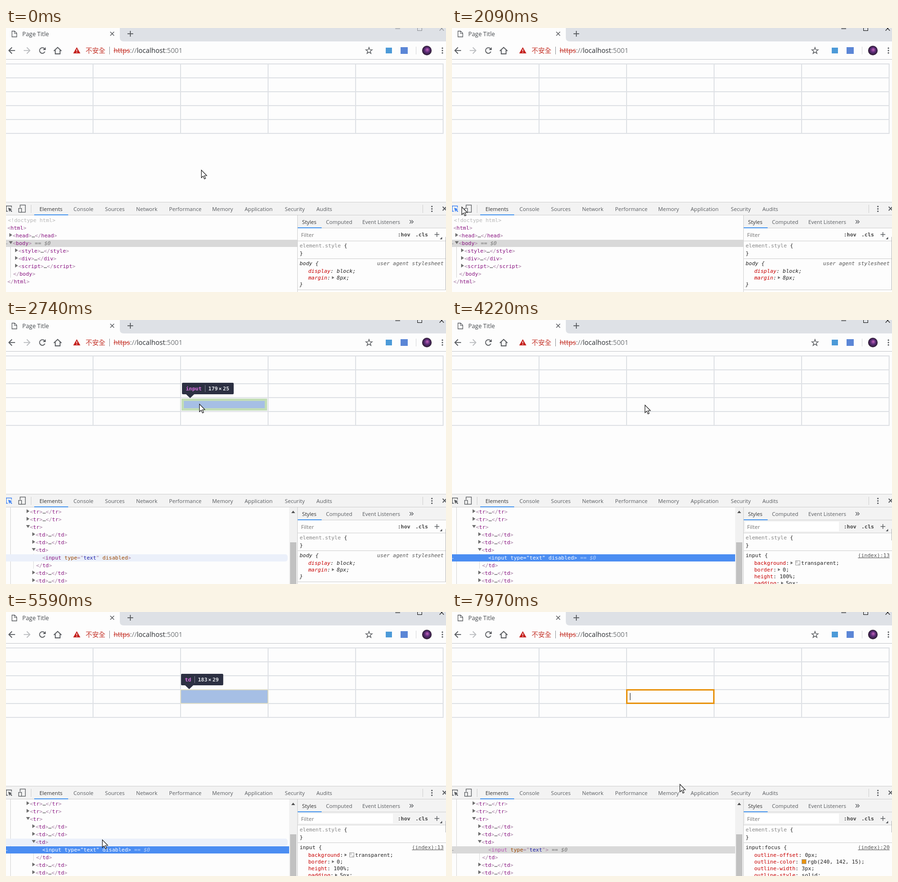
Write an HTML page with a canvas that moves like this. It is 920 by 551 pixels and loops after 8000 ms.

```html
<!DOCTYPE html>
<html lang="en">
<head>
<meta charset="utf-8">
<title>Inspecting a table</title>
<style>
  html, body { margin: 0; width: 100%; height: 100%; overflow: hidden; background: #fdfdfd; }
  canvas { display: block; }
</style>
</head>
<body>
<canvas id="stage" width="920" height="551"></canvas>
<script>
const ctx = document.getElementById('stage').getContext('2d');
const LOOP = 8000;
const sans = (size) => `${size}px "Open Sans", "Noto Sans", sans-serif`;
const MONO = '11px "DejaVu Sans Mono", monospace';
const CJK = '13.7px "Noto Sans CJK TC", "Noto Sans CJK SC", "Noto Sans CJK JP", "Noto Sans CJK", sans-serif';
const CHAR = 6.62;
const INK = '#5a5d61', PANEL = '#f3f3f3', RULE = '#cfcfcf', PAGE = '#fdfdfd', GRID = '#dee1e5';

// Timeline, in ms
const INSPECT = 1920, PICK = 3450, PICK_STYLES = 3520;
const BLUR = 6870, EDIT = 6970, EDIT_STYLES = 7080, FLASH_END = 7680;

// Mouse path: time, x, y
const PATH = [
  [0, 408, 296], [880, 408, 296], [1670, 5, 379], [2020, 5, 379], [2090, 20, 373],
  [2710, 400, 177], [2740, 404, 175], [4200, 404, 175], [4670, 193, 503], [4840, 193, 503],
  [4960, 198, 485], [5080, 199, 480], [5300, 203, 522], [5420, 203, 522], [5590, 201, 475],
  [5660, 201, 475], [6380, 481, 175], [7830, 481, 175], [7970, 476, 359], [8000, 476, 362]
];

function mouseAt(t) {
  const i = Math.max(1, PATH.findIndex(p => p[0] >= t));
  const [t0, x0, y0] = PATH[i - 1], [t1, x1, y1] = PATH[i];
  let k = Math.max(0, (t - t0) / (t1 - t0));
  if (t1 - t0 > 130) k = k * k * (3 - 2 * k);
  return { x: Math.round(x0 + (x1 - x0) * k), y: Math.round(y0 + (y1 - y0) * k) };
}

function rect(x, y, w, h, color) {
  ctx.fillStyle = color;
  ctx.fillRect(x, y, w, h);
}

function shape(points, { fill, stroke, width = 1, close = !!fill }) {
  ctx.beginPath();
  for (let i = 0; i < points.length; i += 2) ctx.lineTo(points[i], points[i + 1]);
  if (close) ctx.closePath();
  if (fill) { ctx.fillStyle = fill; ctx.fill(); }
  if (stroke) { ctx.strokeStyle = stroke; ctx.lineWidth = width; ctx.stroke(); }
}
const line = (points, stroke, width = 1) => shape(points, { stroke, width });

function box(x, y, w, h, stroke, width = 1) {
  ctx.strokeStyle = stroke;
  ctx.lineWidth = width;
  ctx.strokeRect(x, y, w, h);
}

function disc(x, y, r, color) {
  ctx.fillStyle = color;
  ctx.beginPath();
  ctx.arc(x, y, r, 0, 7);
  ctx.fill();
}

function text(s, x, y, color, font = MONO) {
  ctx.font = font;
  ctx.fillStyle = color;
  ctx.fillText(s, x, y + 4);
  return x + ctx.measureText(s).width;
}

function cross(x, y, r, color, width = 1.5) {
  line([x - r, y - r, x + r, y + r], color, width);
  line([x + r, y - r, x - r, y + r], color, width);
}
function plus(x, y, r, color, width = 1.5) {
  line([x - r, y, x + r, y], color, width);
  line([x, y - r, x, y + r], color, width);
}
const dots = (x, y, step) => [-1, 0, 1].forEach(i => disc(x, y + i * step, 1.6, INK));

function triangle(x, y, open) {
  shape(open ? [x - 1, y - 3, x + 7, y - 3, x + 3, y + 3] : [x, y - 4, x + 6, y, x, y + 4], { fill: '#6e6e6e' });
}

function drawBrowser(active) {
  rect(0, 0, 920, 28, '#dee1e6');
  ctx.fillStyle = PAGE;
  ctx.beginPath();
  ctx.moveTo(0, 0); ctx.lineTo(238, 0); ctx.lineTo(238, 20);
  ctx.quadraticCurveTo(238, 28, 246, 28); ctx.lineTo(0, 28);
  ctx.fill();
  shape([12.5, 6.5, 18, 6.5, 22.5, 11, 22.5, 18.5, 12.5, 18.5], { stroke: INK, width: 1.3, close: true });
  line([17.5, 6.5, 17.5, 11.5, 22, 11.5], INK);
  text('Page Title', 34, 13, '#45494d', sans(12.4));
  cross(222, 12, 4, INK);
  plus(260, 12, 6, INK, 1.8);
  const frame = active ? '#111' : '#8d9095';
  line([814, 1.5, 824, 1.5], frame);
  box(860.5, -4.5, 9, 10, frame);
  cross(911, 1, 4.5, frame, 1.1);

  line([19, 47, 6, 47], INK, 1.8);
  line([12.5, 40.5, 6, 47, 12.5, 53.5], INK, 1.8);
  line([37, 47, 50, 47], '#bcbec1', 1.8);
  line([43.5, 40.5, 50, 47, 43.5, 53.5], '#bcbec1', 1.8);
  ctx.strokeStyle = INK;
  ctx.lineWidth = 1.8;
  ctx.beginPath();
  ctx.arc(76, 47, 5.8, 0.4, 5.5);
  ctx.stroke();
  shape([83, 40, 83, 46, 77, 46], { fill: INK });
  line([100, 48, 108, 40.5, 116, 48], INK, 1.8);
  line([103, 46, 103, 54, 113, 54, 113, 46], INK, 1.8);
  shape([148, 40, 155.5, 53, 140.5, 53], { fill: '#c5221f' });
  line([148, 44.5, 148, 48.5], '#fff', 1.5);
  rect(147.3, 50, 1.5, 1.5, '#fff');
  text('不安全', 166.5, 48, '#c5362c', CJK);
  rect(216, 39, 1, 16, '#8f9296');
  const schemeEnd = text('https', 225, 48, '#c5362c', sans(14.2));
  line([225, 47.5, schemeEnd, 47.5], '#c5362c', 1.2);
  const hostStart = text('://', schemeEnd, 48, '#75787b', sans(14.2));
  const hostEnd = text('localhost', hostStart, 48, '#2c2f33', sans(14.2));
  text(':5001', hostEnd, 48, '#75787b', sans(14.2));

  const star = [];
  for (let i = 0; i < 10; i++) {
    const r = i % 2 ? 2.9 : 7, a = i * Math.PI / 5;
    star.push(759 + r * Math.sin(a), 47.5 - r * Math.cos(a));
  }
  shape(star, { stroke: INK, width: 1.4, close: true });
  rect(794, 41, 13, 12, '#4c9ad8');
  rect(825, 40, 15, 14, '#5b86d6');
  rect(857, 39, 1, 16, '#d5d7da');
  const photo = ctx.createRadialGradient(881, 45, 1, 880, 47, 10);
  photo.addColorStop(0, '#b45ab0');
  photo.addColorStop(0.45, '#5a2c78');
  photo.addColorStop(1, '#2a1b2e');
  disc(880, 47, 10, photo);
  dots(912.5, 47, 5);
  rect(0, 65, 920, 1, '#c4c6c9');
}

function drawTable() {
  for (let i = 0; i < 6; i++) {
    rect(0, 74 + 29 * i, 915, 2, GRID);
    rect(183 * i - 2, 74, 2, 147, GRID);
  }
}

// Elements the inspector can point at
const td = (col, row) => ({ name: 'td', x: 183 * col - 1, y: 75 + 29 * row, w: 183, h: 29, edge: 1 });
const input = (col, row) => ({ name: 'input', x: 183 * col + 1, y: 77 + 29 * row, w: 179, h: 25, edge: 5 });
const tr = (row) => ({ name: 'tr', x: -1, y: 75 + 29 * row, w: 915, h: 29, edge: 0 });
const ROOT = { name: 'html', x: -9, y: 66, w: 931, h: 163, edge: 0 };

// Tree rows: markup, x, arrow (c: closed, o: open), element
const TOP_ROWS = [
  ['<!doctype html>', 4], ['<html>', 3], ['<head>…</head>', 14, 'c'], ['<body>', 14, 'o'],
  ['<style>…</style>', 26, 'c'], ['<div>…</div>', 26, 'c'], ['<script>…<\/script>', 26, 'c'],
  ['</body>', 15], ['</html>', 3]
];
const CELL_ROWS = [
  ['<tr>…</tr>', 50, 'c', tr(1)], ['<tr>…</tr>', 50, 'c', tr(2)], ['<tr>', 50, 'o', tr(3)],
  ['<td>…</td>', 62, 'c', td(0, 3)], ['<td>…</td>', 62, 'c', td(1, 3)], ['<td>', 62, 'o', td(2, 3)],
  ['<input type="text" disabled>', 76, '', input(2, 3)], ['</td>', 63, '', td(2, 3)],
  ['<td>…</td>', 62, 'c', td(3, 3)], ['<td>…</td>', 62, 'c', td(4, 3)]
];

function findHover(t) {
  const { x, y } = mouseAt(t - 40);
  if (t >= INSPECT && t < PICK) {
    if (y > 363) return null;
    if (y > 221) return { row: 1, target: ROOT };
    return { row: 6, target: input(Math.floor((x + 1) / 183), Math.floor((y - 75) / 29)) };
  }
  if (t < PICK || y < 392 || x > 592) return null;
  const row = Math.floor((y - 392) / 16);
  return { row, target: CELL_ROWS[row][3] };
}

function drawHighlight({ name, x, y, w, h, edge }) {
  rect(x + edge, y + edge, w - 2 * edge, h - 2 * edge, 'rgba(130,165,220,.7)');
  if (edge) {
    const color = name === 'td' ? 'rgba(240,226,150,.66)' : 'rgba(147,196,125,.55)';
    box(x + edge / 2, y + edge / 2, w - edge, h - edge, color, edge);
  }
  const below = y < 100;
  const left = Math.max(0, x + 1), top = below ? y + h + 9 : y - 33;
  const nameWidth = name.length * CHAR, dimsAt = left + nameWidth + 22;
  const bold = 'bold ' + MONO, dark = '#2c3042';
  ctx.fillStyle = dark;
  ctx.beginPath();
  ctx.roundRect(left, top, nameWidth + 75 + (String(h).length - 2) * CHAR, 24, 2);
  ctx.fill();
  const base = below ? top : top + 24, tip = below ? top - 8 : top + 32;
  shape([left + 8.5, base, left + 25.5, base, left + 17, tip], { fill: dark });
  text(name, left + 8, top + 12, '#d86fe0', bold);
  rect(Math.round(left + nameWidth + 15), top + 5, 1, 14, '#7b7f8c');
  text(w, dimsAt, top + 12, '#dfe1e6', bold);
  text('×', dimsAt + 21.5, top + 12, '#dfe1e6', bold);
  text(h, dimsAt + 30.5, top + 12, '#dfe1e6', bold);
}

function markup(source, x, y, white, tagColor = '#881280') {
  let previous = '';
  for (const token of source.match(/<!.*>|<\/?|>|="|"|\w+|\s+|…/g)) {
    let color = '#a67fa3';
    if (token.startsWith('<!')) color = '#b8b8b8';
    else if (token === '…') color = '#333';
    else if (/\w/.test(token)) {
      color = previous.startsWith('<') ? tagColor : previous === '="' ? '#1a1aa6' : '#994500';
    }
    x = text(token, x, y, white ? '#fff' : color);
    previous = token;
  }
  return x;
}

function drawTree(t, hover) {
  const scrolled = t >= PICK || (hover && hover.target !== ROOT);
  const rows = scrolled ? CELL_ROWS : TOP_ROWS;
  const first = scrolled ? 400 : 401, right = scrolled ? 592 : 609;
  const selected = t >= PICK ? 6 : scrolled ? -1 : 3;
  const blue = t >= PICK && t < BLUR;
  rect(9, scrolled ? 391 : 457, 1, scrolled ? 160 : 64, '#d4d4d4');
  if (scrolled) rect(57, 488, 1, 31, '#dcdcdc');
  rows.forEach(([source, x, arrow], i) => {
    const y = first + 16 * i;
    const isInput = scrolled && i === 6;
    if (i === selected) {
      rect(0, y - 7, right, 15, blue ? '#4b8df2' : '#d9d9d9');
      for (let d = 0; d < 2; d++) rect(d * 2, y + 1, 1, 1, blue ? '#fff' : '#777');
    } else if (hover && hover.row === i) {
      ctx.fillStyle = '#ebf0fa';
      ctx.beginPath();
      ctx.roundRect(0, y - 7, right - 3, 15, [0, 5, 5, 0]);
      ctx.fill();
    }
    if (arrow) triangle(x - 7, y - 1, arrow === 'o');
    const edited = isInput && t >= EDIT;
    if (edited && t < FLASH_END) {
      ctx.globalAlpha = 1 - (t - EDIT) / (FLASH_END - EDIT);
      rect(83, y - 7, 33, 14, '#9a4f96');
      ctx.globalAlpha = 1;
    }
    const end = markup(edited ? source.replace(' disabled', '') : source, x, y,
      i === selected && blue, edited ? '#b850b3' : undefined);
    if (i === selected) text('== $0', end + CHAR, y, blue ? '#b5d0fb' : '#777', 'italic ' + MONO);
  });
  if (scrolled) {
    rect(592, 391, 17, 160, '#f1f1f1');
    shape([596.5, 403, 604.5, 403, 600.5, 398], { fill: '#505050' });
    rect(594, 464, 13, 87, '#c1c1c1');
  }
}

// Style rows: property, value, expandable, swatch
const BODY_RULE = [['display', 'block'], ['margin', '8px', true]];
const INPUT_RULE = [
  ['background', 'transparent', true, '#fff'], ['border', '0', true], ['height', '100%'], ['padding', '5px', true]
];
const FOCUS_RULE = [
  ['outline-offset', '0px'], ['outline-color', 'rgb(240, 142, 15)', false, '#e8930f'],
  ['outline-width', '3px'], ['outline-style', 'solid']
];

function drawRule(selector, origin, declarations, isUserAgent) {
  const font = (isUserAgent ? 'italic ' : '') + MONO;
  text(selector + ' {', 614, 491, '#222', font);
  const originX = 915 - origin.length * CHAR;
  text(origin, originX, 491, '#555', font);
  if (!isUserAgent) rect(originX, 496, 915 - originX, 1, '#555');
  declarations.forEach(([property, value, expandable, swatch], i) => {
    const y = 507 + 14 * i;
    let x = text(property, 632, y, '#c80000', font);
    x = text(':', x, y, '#222', font) + CHAR;
    if (expandable) {
      shape([x - 3.5, y - 3, x + 1.5, y, x - 3.5, y + 3], { fill: '#6e6e6e' });
      x += CHAR;
    }
    if (swatch) {
      rect(x, y - 4, 9, 9, swatch);
      if (swatch === '#fff') {
        rect(x, y - 4, 5, 5, '#ddd');
        rect(x + 5, y + 1, 4, 4, '#ddd');
      }
      box(Math.round(x) + .5, y - 4.5, 9, 9, '#999');
      x += 12;
    }
    text(value + ';', x, y, '#222', font);
  });
}

function drawStyles(t) {
  const picked = t >= PICK_STYLES;
  rect(609, 391, 1, 160, RULE);
  rect(610, 391, 310, 27, PANEL);
  rect(610, 417, 310, 1, RULE);
  rect(610, 416, 50, 2, '#4a97ee');
  text('Styles', 619, 405, '#333', sans(11.2));
  text('Computed', 669, 405, INK, sans(11.2));
  text('Event Listeners', 745, 405, INK, sans(11.2));
  for (const x of [844, 848]) line([x, 401, x + 3.5, 404.5, x, 408], INK, 1.4);
  rect(610, 418, 310, 26, picked ? PANEL : PAGE);
  rect(613, 421, 196, 20, picked ? '#fff' : PAGE);
  text('Filter', 617, 432, '#757575', sans(11.5));
  text(':hov', 819, 431, '#444', 'bold ' + MONO);
  text('.cls', 856, 431, '#444', 'bold ' + MONO);
  plus(901, 431, 5, INK, 1.4);
  shape([912, 436, 912, 441, 907, 441], { fill: INK });
  rect(610, 444, 310, 1, RULE);
  text('}', 614, 470, '#222');
  text(' {', text('element.style', 614, 454, '#888'), 454, '#222');
  rect(610, 481, 310, 1, RULE);
  if (t >= EDIT_STYLES) drawRule('input:focus', '(index):20', FOCUS_RULE);
  else if (picked) drawRule('input', '(index):13', INPUT_RULE);
  else {
    drawRule('body', 'user agent stylesheet', BODY_RULE, true);
    text('}', 614, 535, '#222', 'italic ' + MONO);
    rect(610, 546, 310, 1, RULE);
  }
  rect(919, 436, 1, picked ? 24 : 110, '#b5b5b5');
}

const TABS = [['Elements', 70], ['Console', 141], ['Sources', 207], ['Network', 272], ['Performance', 341],
  ['Memory', 431], ['Application', 499], ['Security', 583], ['Audits', 649]];

function drawDevtools(t, hover) {
  rect(0, 363, 920, 188, PAGE);
  rect(0, 363, 920, 28, PANEL);
  rect(0, 363, 920, 1, RULE);
  rect(0, 390, 920, 1, RULE);
  const picker = t >= INSPECT && t < PICK ? '#4285f4' : INK;
  line([4, 382.5, .5, 382.5, .5, 371.5, 11.5, 371.5, 11.5, 375], picker, 1.3);
  shape([4.5, 375, 13, 378, 9.8, 379.3, 13, 382.5, 11.5, 384, 8.3, 380.8, 7, 384], { fill: picker });
  box(29.5, 369.5, 11, 15, INK, 1.3);
  rect(25, 375, 8, 10, PANEL);
  box(26.5, 376.5, 6, 8, INK, 1.3);
  rect(52, 369, 1, 17, RULE);
  TABS.forEach(([label, x], i) => text(label, x, 378, i ? INK : '#333', sans(11.2)));
  rect(59, 389, 71, 2, '#4a97ee');
  rect(871, 369, 1, 17, RULE);
  dots(890.5, 377.5, 5);
  cross(917, 377, 4, INK, 1.8);
  drawTree(t, hover);
  drawStyles(t);
}

function drawMouse(t) {
  const { x, y } = mouseAt(t);
  if (t >= EDIT && y > 163 && y < 190) {
    line([x - 3, y - 7.5, x + 4, y - 7.5], '#222');
    line([x + .5, y - 7, x + .5, y + 8], '#222');
    line([x - 3, y + 8.5, x + 4, y + 8.5], '#222');
    return;
  }
  ctx.save();
  ctx.translate(x + .5, y + .5);
  shape([0, 0, 0, 16, 3.7, 12.6, 6.3, 18.5, 8.8, 17.4, 6.3, 11.7, 11.3, 11.5],
    { fill: '#fff', stroke: '#111', width: 1.1 });
  ctx.restore();
}

function draw(t) {
  const hover = findHover(t);
  rect(0, 0, 920, 551, PAGE);
  drawBrowser(t >= INSPECT);
  drawTable();
  if (t >= EDIT) {
    box(365.5, 162.5, 182, 28, '#e8930f', 3);
    if ((t - EDIT) % 1000 < 500) rect(372, 169, 1, 15, '#111');
  }
  if (hover) drawHighlight(hover.target);
  drawDevtools(t, hover);
  drawMouse(t);
}

function tick() {
  draw(performance.now() % LOOP);
  requestAnimationFrame(tick);
}
tick();
</script>
</body>
</html>
```
